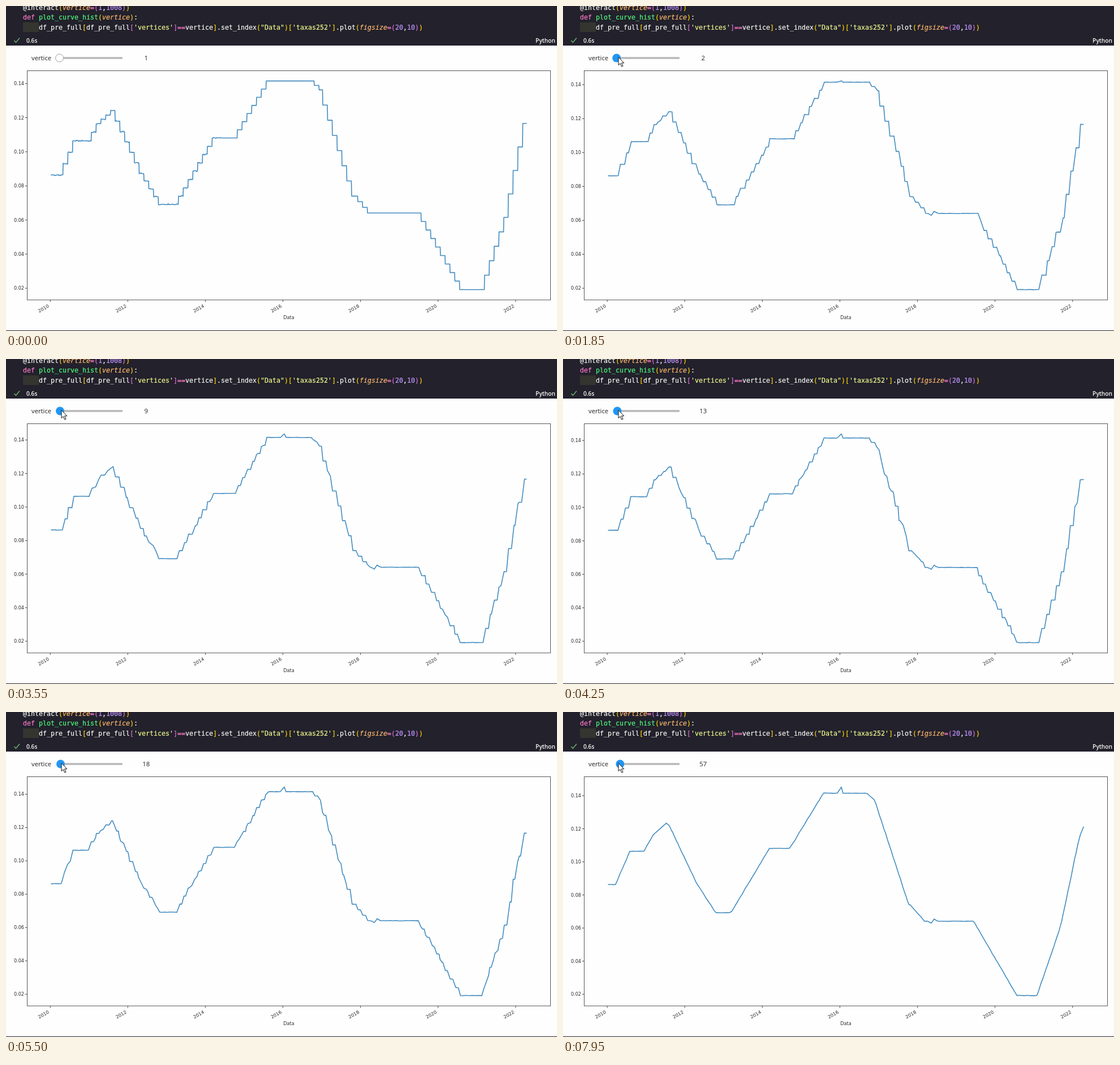
These frames come from a looping animation (974 px wide and 575 px high, 8 s). An HTML page:

```html
<!DOCTYPE html>
<html lang="en">
<head>
<meta charset="utf-8">
<title>Curve history</title>
<style>
  html, body { margin: 0; width: 100%; height: 100%; overflow: hidden; background: #fefefe; }
  svg { display: block; }
  .code { font: 11.64px "DejaVu Sans Mono", monospace; white-space: pre; color: #f8f8f2; }
  .code text, .code tspan { fill: currentColor; stroke: currentColor; stroke-width: .2; }
  .ui { font: 600 10.2px "Open Sans", sans-serif; fill: #f8f8f2; }
  .widget { font: 11.3px "Open Sans", sans-serif; fill: #222; }
  .axis { font: 8.1px "DejaVu Sans", sans-serif; fill: #2b2b2b; }
  .axis line { stroke: #444; }
  .code .fn { color: #50fa7b; }
  .code .kw { color: #ff79c6; }
  .code .num { color: #bd93f9; }
  .code .str { color: #f1fa8c; }
  .code .arg { color: #ffb86c; font-style: italic; }
  .code .b1 { color: #ffd700; }
  .code .b2 { color: #da70d6; }
</style>
</head>
<body>
<svg width="974" height="575" viewBox="0 0 974 575">
  <rect width="974" height="575" fill="#fefefe"/>
  <rect width="974" height="70" fill="#22212c"/>
  <rect y="574" width="974" height="1" fill="#22212c"/>
  <rect x="30" y="29" width="28" height="17" fill="#34352f"/>
  <g class="code">
    <text x="30" y="7">@interact<tspan class="b1">(</tspan><tspan class="arg">vertice</tspan><tspan class="kw">=</tspan><tspan class="b2">(</tspan><tspan class="num">1</tspan>,<tspan class="num">1008</tspan><tspan class="b2">)</tspan><tspan class="b1">)</tspan></text>
    <text x="30" y="24"><tspan class="kw">def</tspan> <tspan class="fn">plot_curve_hist</tspan><tspan class="b1">(</tspan><tspan class="arg">vertice</tspan><tspan class="b1">)</tspan>:</text>
    <text x="58" y="42">df_pre_full<tspan class="b1">[</tspan>df_pre_full<tspan class="b2">[</tspan><tspan class="str">'vertices'</tspan><tspan class="b2">]</tspan><tspan class="kw">==</tspan>vertice<tspan class="b1">]</tspan>.set_index<tspan class="b1">(</tspan><tspan class="str">"Data"</tspan><tspan class="b1">)[</tspan><tspan class="str">'taxas252'</tspan><tspan class="b1">]</tspan>.plot<tspan class="b1">(</tspan><tspan class="arg">figsize</tspan><tspan class="kw">=</tspan><tspan class="b2">(</tspan><tspan class="num">20</tspan>,<tspan class="num">10</tspan><tspan class="b2">)</tspan><tspan class="b1">)</tspan></text>
  </g>
  <path d="M14.5 61l3 3.5 6.5-8" fill="none" stroke="#6fb56f" stroke-width="1.4"/>
  <g class="ui">
    <text x="36" y="65">0.6s</text>
    <text x="971" y="65" text-anchor="end">Python</text>
  </g>
  <g class="widget">
    <text x="45" y="96">vertice</text>
    <text id="count" x="247.7" y="96" text-anchor="middle">1</text>
  </g>
  <rect x="95" y="90.2" width="111" height="3.6" rx="1" fill="#b8b8b8"/>
  <circle id="thumb" cy="92"/>
  <rect x="37.5" y="114.5" width="925" height="405.5" fill="none" stroke="#555"/>
  <g id="ticks" class="axis"></g>
  <text class="axis" x="500" y="553.5" text-anchor="middle">Data</text>
  <path id="curve" fill="none" stroke="#1f77b4" stroke-opacity=".84" stroke-width="1.6" stroke-linejoin="round"/>
  <path id="cursor" d="M.5 .5V14.6L3.7 11.6L6.2 17.2L8.5 16.2L6 10.8H10.4Z" fill="#fff" stroke="#111"/>
</svg>
<script>
const $ = id => document.getElementById(id);
const LOOP = 8000, LEFT = 79.5, RIGHT = 920.5, FLOOR = 499.3, TOP = 132.5;
const START = 863, PEAK = 1415, GAP = 8.5;

// Runs of equal rate moves, one per meeting: first x, moves, final rate in basis points
const RUNS = [
  [101, 3, 1064], [151, 2, 1165], [168, 3, 1241], [193, 6, 873], [244, 4, 692],
  [305, 8, 1081], [409, 7, PEAK], [545, 2, 1363], [560, 7, 740], [622, 3, 641],
  [734, 9, 192], [846, 5, 615], [888, 4, 1166], [923, 1, 1236]
];

// Slider value over time, linear in between
const DRAG = [[1900, 2], [2950, 7], [4250, 13], [5500, 18], [6450, 44], [7550, 45], [7950, 57]];

const clamp01 = x => Math.min(1, Math.max(0, x));
const span = (t, from, to) => clamp01((t - from) / (to - from));
const rand = (i, seed) => {
  const s = Math.sin(i * 12.9898 + seed * 78.233) * 43758.5453;
  return s - Math.floor(s);
};
const bump = (x, mid, left, right) =>
  clamp01(1 - (x < mid ? (mid - x) / left : (x - mid) / right));

const moves = [];
RUNS.reduce((from, [x, n, to]) => {
  for (let i = 0; i < n; i++) moves.push({ x: x + i * GAP, by: (to - from) / n });
  return to;
}, START);

// Mean rate over the window that follows x
const meanRate = (x, width) =>
  moves.reduce((sum, m) => sum + m.by * span(x + width, m.x, m.x + width), START);

function drawChart(v) {
  const y14 = Math.min(148, 137.2 + 2.9 * Math.log(v));
  const unit = (FLOOR - y14) / 1200;
  const yOf = rate => FLOOR - (rate - 200) * unit;
  const spike = 200 + (FLOOR - TOP) / unit - PEAK;
  const width = Math.max(0.01, (v - 1) * 0.155);

  // Daily data for the first vertice, sparse dates for the others
  const daily = v === 1;
  const xs = daily ? [] : [485, 492, 495, 651, 656];
  for (let x = LEFT, i = 0; x < RIGHT; i++) {
    xs.push(x);
    x += daily ? 0.5 : 1.5 + 4 * rand(i, v);
  }
  xs.push(RIGHT);
  xs.sort((a, b) => a - b);

  const points = xs.map(x => {
    const noise = daily ? (x < 380 ? 5 : 0) : 2;
    let rate = meanRate(x, width) + noise * (rand(Math.floor(x / 2), v) - 0.5);
    if (!daily) {
      rate += spike * bump(x, 492, 7, 3) - 11 * bump(x, 651, 6, 3) + 13 * bump(x, 656, 3, 6);
    }
    return x.toFixed(1) + ' ' + yOf(rate).toFixed(2);
  });
  $('curve').setAttribute('d', 'M' + points.join('L'));

  let ticks = '';
  for (let i = 0; i < 7; i++) {
    const y = yOf(200 + i * 200), x = 78.2 + i * 137.1;
    ticks += `<line x1="34" x2="37.5" y1="${y}" y2="${y}"/>
      <text x="32" y="${y + 3}" text-anchor="end">${(0.02 + i * 0.02).toFixed(2)}</text>
      <line x1="${x}" x2="${x}" y1="520" y2="523.5"/>
      <text transform="translate(${x - 1.5} 532.5) rotate(-30)" text-anchor="end">${2010 + i * 2}</text>`;
  }
  $('ticks').innerHTML = ticks;
}

function valueAt(t) {
  if (t < 1550) return 1;
  const i = DRAG.findIndex(k => k[0] > t);
  if (i === 0) return DRAG[0][1];
  if (i < 0) return DRAG[DRAG.length - 1][1];
  const [t0, a] = DRAG[i - 1], [t1, b] = DRAG[i];
  return Math.floor(a + (b - a) * span(t, t0, t1));
}

let plotted = 0;
function render() {
  const t = Math.floor(performance.now() % LOOP / 50) * 50;
  const value = valueAt(t);
  // The plot is refreshed less often than the slider
  const chart = valueAt(Math.floor((t - 100) / 350) * 350 + 100);
  if (chart !== plotted) drawChart(plotted = chart);

  $('count').textContent = value;
  const thumb = $('thumb'), hover = t >= 450;
  thumb.setAttribute('cx', 94.6 + (value - 1) * 0.112);
  thumb.setAttribute('r', 7 + 0.5 * span(t, 1200, 1300));
  thumb.setAttribute('fill', hover ? '#2196f3' : '#fff');
  thumb.setAttribute('stroke', hover ? 'none' : '#9e9e9e');

  const enter = span(t, 50, 250);
  const x = 27 + 70.5 * enter * (2 - enter);
  const y = -6 + 85 * enter + 11 * span(t, 350, 550);
  $('cursor').setAttribute('visibility', t < 50 ? 'hidden' : 'visible');
  $('cursor').setAttribute('transform', `translate(${x} ${y})`);
  requestAnimationFrame(render);
}
render();
</script>
</body>
</html>
```
